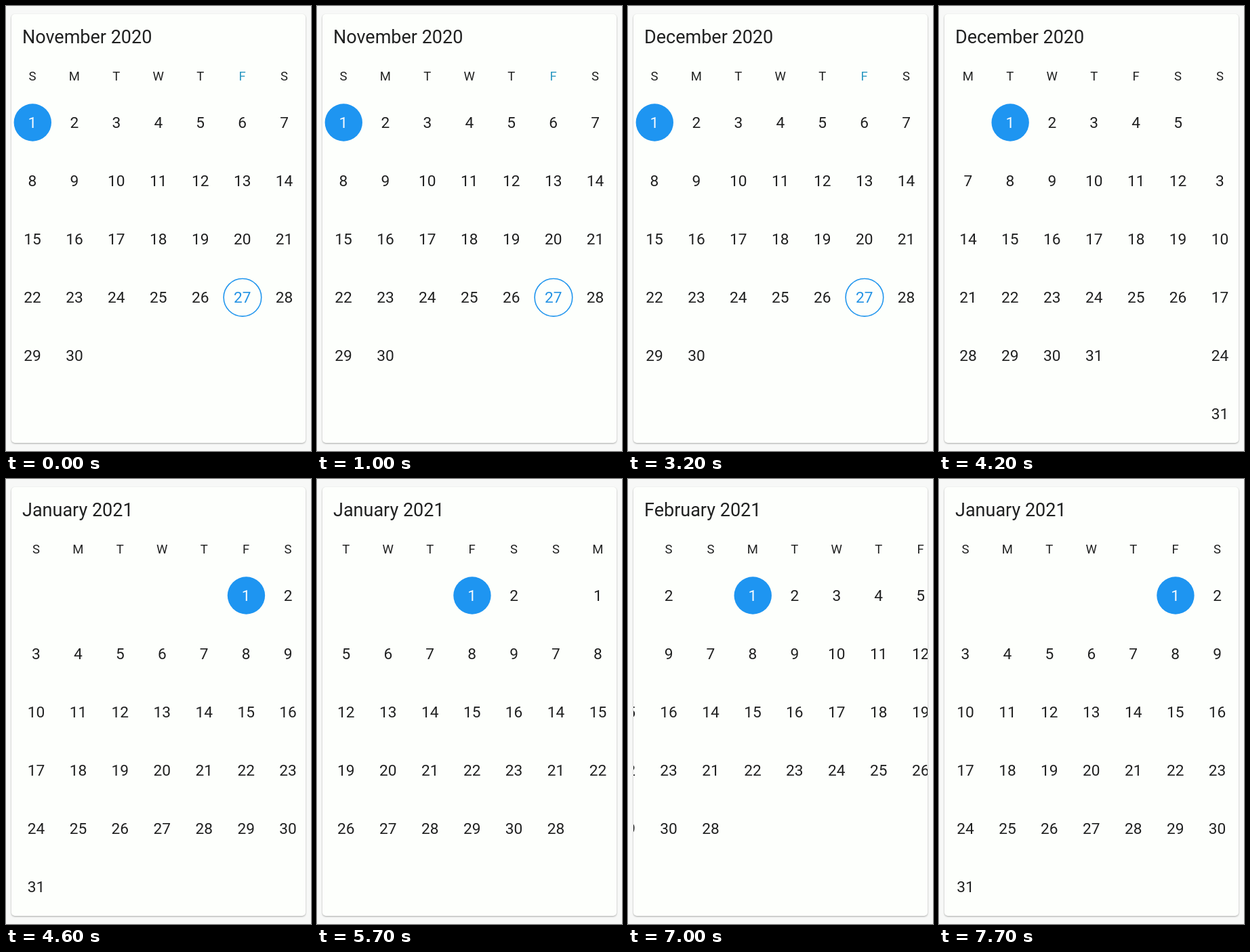
These frames come from a looping animation (450 px wide and 657 px high, 8000 ms). An HTML page:

```html
<!DOCTYPE html>
<html lang="en">
<head>
<meta charset="utf-8">
<title>Calendar</title>
<style>
  html, body { margin: 0; width: 100%; height: 100%; overflow: hidden; background: #f7f8f7; }
  svg { display: block; width: 100vw; height: 100vh; font-family: Roboto, sans-serif; fill: #202121; }
  .card { fill: #fdfffc; filter: drop-shadow(0 1px 1.2px rgba(0, 0, 0, .32)); }
  .title { font-size: 27px; }
  .weekday { font-size: 18.5px; text-anchor: middle; }
  .day { font-size: 22.7px; text-anchor: middle; }
  .dot { fill: #1e95f1; visibility: hidden; }
  .selected .dot { visibility: visible; }
  .selected .first { fill: #f4faff; }
  .ring { fill: none; stroke: #2196ee; stroke-width: 1.6; }
  .today { fill: #2593e4; }
  .weekday.today { fill: #2b98c2; }
</style>
</head>
<body>
<svg viewBox="0 0 450 657">
  <clipPath id="inside"><rect x="8" y="12" width="434" height="633" rx="5"/></clipPath>
  <rect class="card" x="8" y="12" width="434" height="633" rx="5"/>
  <text class="title" x="24" y="54.5"></text>
  <g clip-path="url(#inside)"><g id="strip"></g></g>
</svg>
<script>
const LOOP = 8000, COLUMN = 61.93, ROW = 86, PAGE = COLUMN * 7;

const months = [
  { title: 'November 2020', start: 0, days: 30, today: 27 },
  { title: 'December 2020', start: 2, days: 31 },
  { title: 'January 2021', start: 5, days: 31 },
  { title: 'February 2021', start: 1, days: 28 }
];

// [time, page, offset from that page, title month, selected month]
const steps = [
  [0, 0, 0, 0, 0],
  [3200, 0, 0, 1, 0],
  [3300, 0, 165, 1, 1],
  [3400, 0, 375, 1, 1],
  [3500, 1, 0, 1, 1],
  [4200, 1, 58, 1, 1],
  [4300, 1, 192, 1, 1],
  [4400, 1, 317, 2, 1],
  [4500, 1, 381, 2, 2],
  [4600, 1, 428, 2, 2],
  [4700, 2, 0, 2, 2],
  [5700, 2, 120, 2, 2],
  [5800, 2, 242, 3, 2],
  [5900, 2, 364, 3, 3],
  [6000, 2, 420, 3, 3],
  [6100, 3, 0, 3, 3],
  [7000, 3, -83, 3, 3],
  [7100, 3, -205, 3, 3],
  [7200, 3, -325, 2, 3],
  [7300, 3, -392, 2, 2],
  [7400, 3, -423, 2, 2],
  [7500, 2, 0, 2, 2]
];

const strip = document.getElementById('strip');
const title = document.querySelector('.title');

function add(parent, tag, attributes, text = '') {
  const node = document.createElementNS('http://www.w3.org/2000/svg', tag);
  for (const key in attributes) node.setAttribute(key, attributes[key]);
  node.textContent = text;
  return parent.appendChild(node);
}

const pages = months.map((month, index) => {
  const page = add(strip, 'g', { transform: `translate(${index * PAGE} 0)` });
  const columnX = column => 39 + column * COLUMN;

  [...'SMTWTFS'].forEach((letter, column) => {
    const isToday = month.today && column === (month.start + month.today - 1) % 7;
    add(page, 'text', {
      class: isToday ? 'weekday today' : 'weekday', x: columnX(column), y: 110
    }, letter);
  });

  for (let day = 1; day <= month.days; day++) {
    const cell = month.start + day - 1;
    const x = columnX(cell % 7), y = 172 + Math.floor(cell / 7) * ROW;
    const circle = { cx: x + .3, cy: y };
    if (day === 1) add(page, 'circle', { ...circle, class: 'dot', r: 27.7 });
    if (day === month.today) add(page, 'circle', { ...circle, cy: y + .3, class: 'ring', r: 27.8 });
    const state = day === 1 ? ' first' : day === month.today ? ' today' : '';
    add(page, 'text', { class: 'day' + state, x, y: y + 8 }, day);
  }
  return page;
});

let shown;
function draw(now) {
  const time = now % LOOP;
  const step = steps.findLast(([start]) => start <= time);
  if (step !== shown) {
    shown = step;
    const [, page, offset, named, selected] = step;
    title.textContent = months[named].title;
    strip.setAttribute('transform', `translate(${-page * PAGE - offset} 0)`);
    pages.forEach((node, i) => node.classList.toggle('selected', i === selected));
  }
}

const begin = performance.now();
function tick() {
  draw(performance.now() - begin);
  requestAnimationFrame(tick);
}
tick();
</script>
</body>
</html>
```
